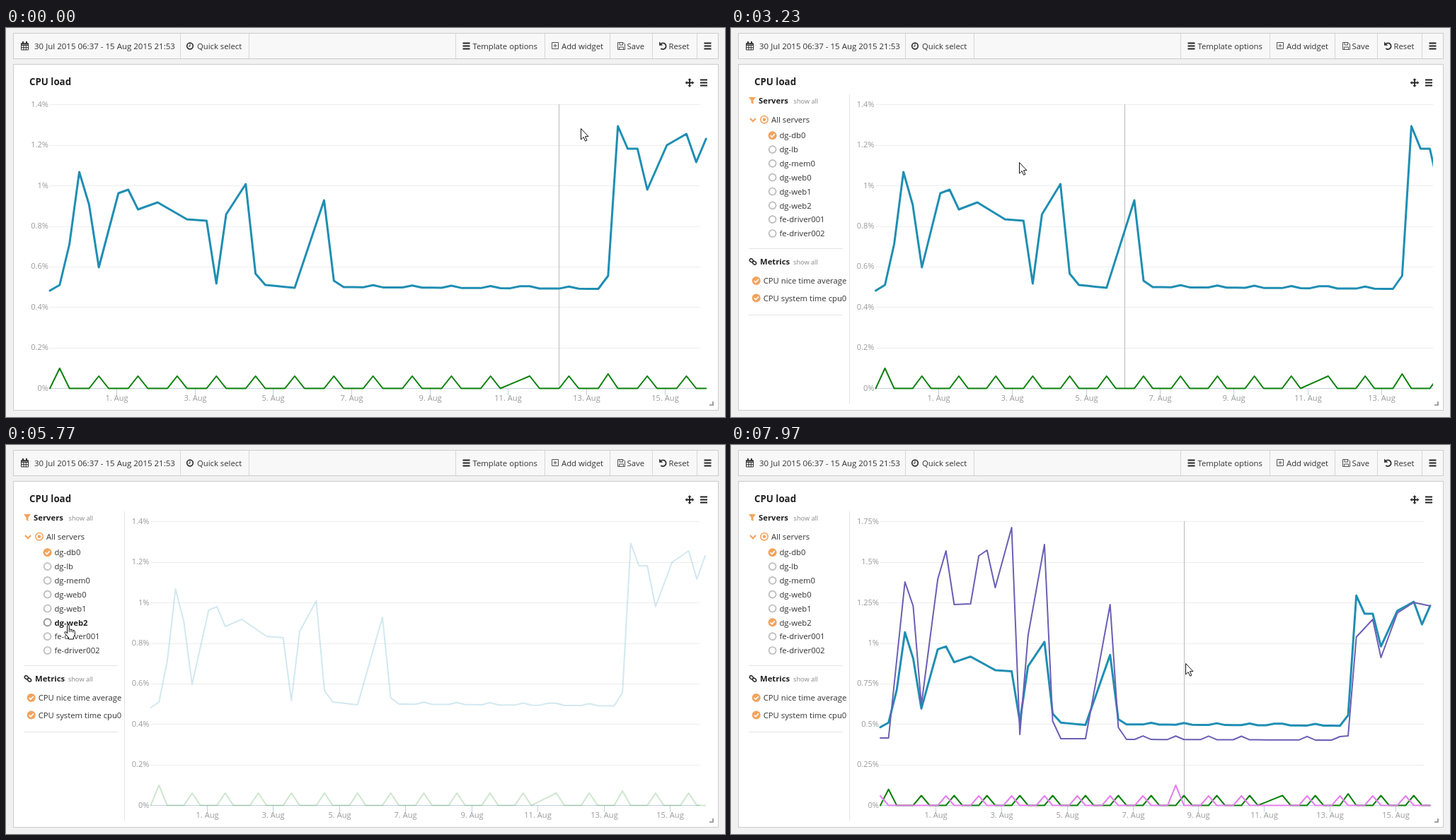
These frames come from a looping animation (1016 px wide and 551 px high, 8000 ms). An HTML page:

```html
<!DOCTYPE html>
<html lang="en">
<head>
<meta charset="utf-8">
<title>CPU load widget</title>
<style>
  html, body { margin: 0; width: 100%; height: 100%; overflow: hidden; background: #f1f1f1; }
  svg { display: block; width: 1016px; height: 551px; font: 11.3px "Open Sans", sans-serif; fill: #333; }
  .title { font-size: 13.3px; font-weight: 700; fill: #222; }
  .head { font-weight: 700; fill: #222; }
  .small { font-size: 9.2px; fill: #888; }
  .axis text { font-size: 11.1px; fill: #999; }
  .rule { stroke: #e4e4e4; fill: none; }
  .grid { stroke: #ededed; }
  .base { stroke: #c0d0e0; }
  .ink { stroke: #333; fill: none; }
  .soft { stroke: #555; fill: none; }
  .orange { fill: #f3a35c; }
  .ring { fill: #fff; stroke: #bbb; stroke-width: 1.7; }
  .series path { fill: none; stroke-width: 2; stroke-linejoin: round; stroke-linecap: round; }
  .item.hover text { font-weight: 700; fill: #222; }
  .item.hover .ring { stroke: #999; stroke-width: 2; }
  .tick { fill: none; stroke: #fff; stroke-width: 1.8; }
  .item .on { display: none; }
  .item.checked .on { display: inline; }
  .item.checked .ring { display: none; }
</style>
</head>
<body>
<svg viewBox="0 0 1016 551">
  <defs>
    <path id="bars" d="M-5-4H5M-5 0H5M-5 4H5" stroke="#222" stroke-width="2"/>
    <g id="check"><circle r="6" class="orange"/><path class="tick" d="M-3 0L-.8 2.3 3.2-2"/></g>
    <clipPath id="plot"><rect x="20" y="90" width="972" height="450"/></clipPath>
  </defs>

  <g id="toolbar">
    <rect x="10.5" y="7.5" width="996" height="36" fill="#f8f8f8" stroke="#ccc"/>
    <path stroke="#d6d6d6" d="M246.5 8V43M343.5 8V43M635.5 8V43M761.5 8V43M853.5 8V43M913.5 8V43M976.5 8V43"/>
    <g class="ink">
      <path d="M21.5 22H31.5V31H21.5ZM21.5 24.5H31.5M21.5 27.7H31.5M25 24V31M28.3 24V31"/>
      <path d="M21 22.5H32M24 19V23M29 19V23" stroke-width="2"/>
      <circle cx="260" cy="25.5" r="4.3" stroke-width="1.7"/><path d="M260 22.5V26H257.8"/>
      <path d="M925 22.8A4.4 4.4 0 1 1 925.3 29" stroke-width="1.8"/>
    </g>
    <path class="soft" d="M771.5 20.5H780.5V29.5H771.5ZM773.5 25H778.7M776 22.5V27.7"/>
    <path class="soft" d="M864.5 20.5H872L874.5 23V30.5H864.5ZM867 20.5V24H871.5V20.5M866.5 30.5V27H872.5V30.5"/>
    <path d="M923 19.5V24.8H928.3Z"/>
    <use href="#bars" x="650.5" y="25.5"/><use href="#bars" x="991.5" y="25.5"/>
    <text x="40" y="30" font-size="11.5">30 Jul 2015 06:37 - 15 Aug 2015 21:53</text>
    <text x="270" y="30">Quick select</text>
    <text x="659.5" y="30">Template options</text>
    <text x="785" y="30">Add widget</text>
    <text x="877.5" y="30">Save</text>
    <text x="936.5" y="30">Reset</text>
  </g>

  <rect x="10.5" y="51.5" width="996" height="490" fill="#fff" stroke="#ccc"/>
  <text class="title" x="33" y="81">CPU load</text>
  <use href="#bars" x="986" y="77.5"/>
  <g id="handles">
    <path d="M961 77.5H971M966 72.5V82.5" stroke="#222" stroke-width="1.8"/>
    <path d="M966 71L968.6 74H963.4ZM966 84L968.6 81H963.4ZM959.5 77.5L962.5 74.9V80.1ZM972.5 77.5L969.5 74.9V80.1Z"/>
    <path d="M994 534H999V529" fill="none" stroke="#888" stroke-width="1.6"/>
  </g>

  <g id="sidebar">
    <path class="rule" d="M25 312.5H158M25 406.5H158M167.5 94V533"/>
    <path class="orange" d="M25 98H35L31.5 102.5V108L28.5 106V102.5Z"/>
    <text class="head" x="39" y="107">Servers</text><text class="small" x="88.5" y="107">show all</text>
    <path d="M27 128L31 132.2 35 128" fill="none" stroke="#f3a35c" stroke-width="2.2"/>
    <circle cx="47" cy="129.7" r="5.2" fill="#fff" stroke="#f3a35c" stroke-width="1.6"/>
    <circle class="orange" cx="47" cy="129.7" r="2.3"/>
    <text x="57" y="134">All servers</text>
    <g id="servers"></g>
    <g class="ink" stroke-width="1.6" transform="translate(31 331) rotate(40)">
      <rect x="-5.5" y="-2" width="5.6" height="4" rx="2"/><rect x="-.2" y="-2" width="5.6" height="4" rx="2"/>
    </g>
    <text class="head" x="41" y="335">Metrics</text><text class="small" x="88" y="335">show all</text>
    <use href="#check" x="35.7" y="358"/><text x="45.7" y="362">CPU nice time average</text>
    <use href="#check" x="35.7" y="382.5"/><text x="45.7" y="386.5">CPU system time cpu0</text>
  </g>

  <g id="chart" clip-path="url(#plot)">
    <g class="axis" id="axis"></g>
    <line id="cross" y1="108" y2="510" stroke="#bbb"/>
    <g class="series" id="series"></g>
  </g>

  <g id="menu">
    <rect x="840" y="90" width="153" height="231" fill="#000" opacity=".12"/>
    <rect x="838.5" y="88.5" width="153" height="230" fill="#f7f7f7" stroke="#b8b8b8"/>
    <rect id="lit" x="839" width="152" height="25.5" fill="#fff"/>
  </g>

  <g id="cursor">
    <path id="arrow" fill="#fff" stroke="#111" d="M.5.5V16L4.1 12.6 6.6 18.2 8.9 17.2 6.5 11.7H11Z"/>
    <path id="hand" fill="#fff" stroke="#111" stroke-linejoin="round"
      d="M4.5 13V2Q4.5.5 5.8.5 7.2.5 7.2 2V7.5Q8.5 5.8 10 7.8 11.4 6.8 12.6 8.6 15.3 8 15.3 10.5V14.5L13.5 18.5V21H6.5V19L1 12.5Q.2 10.8 1.8 10.5Q3 10.6 4.5 13ZM7.2 7.5V11M10 8V11M12.6 9V11.5"/>
  </g>
</svg>

<script>
const LOOP = 8000, BASE = 510.5, ROW = 19.83, MENU_ROW = 25.5;
const MENU_OPEN = 1430, SIDEBAR_OPEN = 2730, CLEARED = 6330, RELOADED = 6530;
const LAG = 270; // the page reacts to the pointer this late
const SAMPLES = 68, LAST = SAMPLES - 1;

const $ = id => document.getElementById(id);
const svgAdd = (parent, html) => parent.insertAdjacentHTML('beforeend', html);
const range = n => [...Array(n).keys()];
const show = (el, on) => el.setAttribute('display', on ? 'inline' : 'none');
const lerp = (a, b, u) => a + (b - a) * u;
const part = (t, from, to) => Math.min(1, Math.max(0, (t - from) / (to - from)));
const swing = u => .5 - Math.cos(Math.PI * u) / 2;
const easeOut = u => 1 - (1 - u) ** 2;

// A spike every fourth sample, with a few taller or missing ones.
const spikes = (phase, top, odd) => range(SAMPLES).map(i => odd[i] ?? (i % 4 === phase ? top : BASE));

// Straight lines between key points; the idle stretch ripples with the spikes.
function load(keys, beat, ripple) {
  return range(SAMPLES).map(i => {
    const n = Math.max(1, keys.findIndex(k => k[0] >= i));
    const [a, ya] = keys[n - 1], [b, yb] = keys[n];
    const idle = i > 30 && i < 57;
    return lerp(ya, yb, (i - a) / (b - a)) - (idle && beat[i] < 500 ? ripple : 0);
  });
}

const green = spikes(1, 493, { 1: 482, 47: 504.7, 48: 498.8, 57: 490 });
const pink = spikes(0, 497, { 4: BASE, 36: 482, 48: BASE });
const blue = load([
  [0, 372], [1, 364], [2, 306], [3, 204], [4, 250], [5, 339], [7, 234], [8, 229], [9, 257], [11, 247],
  [14, 271], [16, 273], [17, 362], [18, 264], [20, 221], [21, 348], [22, 364], [25, 368], [28, 244],
  [29, 358], [30, 367], [56, 369.5], [57, 351], [58, 139], [59, 171], [60, 171], [61, 229], [63, 166],
  [65, 150], [66, 190], [67, 157]], green, 3);
const purple = load([
  [0, 415], [1, 415], [3, 194], [4, 228], [5, 368], [7, 190], [8, 150], [9, 226], [11, 225], [12, 157],
  [13, 149], [14, 202], [16, 117], [17, 410], [18, 270], [20, 141], [21, 391], [22, 416], [25, 416],
  [28, 226], [29, 400], [30, 417], [56, 418], [57, 412], [58, 272], [60, 247], [61, 301], [63, 238],
  [65, 223], [67, 228]], pink, 5);

// Each curve's heights are stage pixels on an axis that tops out at max.
const series = [
  { ys: blue, color: '#1f8eb3', max: 1.4 },
  { ys: green, color: '#0a800a', max: 1.4 },
  { ys: purple, color: '#6a5fb5', max: 1.75 },
  { ys: pink, color: '#e57eee', max: 1.75 }
];

// Pointer moves: start, end, x, y. It rests in between.
const moves = [
  [160, 170, 877, 138], [330, 1130, 985, 75], [1170, 1200, 977, 75],
  [1430, 2100, 953, 115], [2100, 2230, 951, 125], [2300, 2330, 942, 130],
  [2730, 3230, 407, 190], [3600, 3800, 347, 201], [3800, 4370, 177, 222],
  [4430, 5230, 103, 239], [5300, 5430, 97, 254], [5570, 5770, 82, 254], [5770, 6000, 62, 254],
  [6530, 7300, 402, 311], [7330, 7750, 642, 309]
];
function pointerAt(t) {
  let x = t < 0 ? 781 : 812, y = 142;
  for (const [from, to, nx, ny] of moves) {
    const u = easeOut(part(t, from, to));
    x = lerp(x, nx, u);
    y = lerp(y, ny, u);
  }
  return { x, y };
}

function layout(t) {
  if (t >= RELOADED) return { left: 211, width: 777, max: 1.75 };
  if (t < SIDEBAR_OPEN) return { left: 62, width: 927.2, max: 1.4 };
  return { left: 204.5, width: lerp(927.2, 783.5, swing(part(t, 3061, 3471))), max: 1.4 };
}

function build() {
  const names = ['dg-db0', 'dg-lb', 'dg-mem0', 'dg-web0', 'dg-web1', 'dg-web2', 'fe-driver001', 'fe-driver002'];
  names.forEach((name, i) => svgAdd($('servers'),
    `<g class="item${i ? '' : ' checked'}" transform="translate(58.6 ${152.2 + i * ROW})">
      <circle class="ring" r="5"/><use class="on" href="#check"/><text x="9.8" y="4.2">${name}</text></g>`));

  const line = d => `<path class="ink" d="${d}" stroke-width="1.5"/>`;
  const solid = d => `<path d="${d}"/>`;
  const items = [
    ['Widget settings', '<circle class="ink" r="2.9" stroke-width="2.4"/><circle class="ink" r="4.6" stroke-width="1.4" stroke-dasharray="1.8 1.8"/>'],
    ['Show legend', line('M-5-4H5.5M-1-1.3H5.5M-1 1.3H5.5M-5 4H5.5') + solid('M-5-2.5L-2 0-5 2.5Z')],
    ['Show tooltip', line('M-5-4H5V4H-5ZM-5-3H5M-3-.5H3.5M-3 2H3.5')],
    ['Enable time lock', solid('M-3-5H3V-4L2-3.5V-.5L3.6 1.5H.6L0 5.5-.6 1.5H-3.6L-2-.5V-3.5L-3-4Z')],
    ['Line width', line('M-5.5-5V4.5H6M-4 2.5L-1-.5 1 1 5-3.5M2.5-4H5V-1.5')],
    ['Chart type', line('M-5.5-5V4.5H6') + solid('M-4 3V.5L-1.5-3 1-.8 3-2.5 5 1V3Z')],
    ['Aggregator mode', '<circle class="ink" r="4.2" stroke-width="1.5"/>' + solid('M0-4.5A4.5 4.5 0 0 0 0 4.5Z')],
    ['Export data', line('M-4-4H4V4H-4Z') + solid('M-1.6-2.5L2.4 0-1.6 2.5Z')],
    ['Delete this widget', '<path d="M-3-3L3 3M3-3L-3 3" stroke="#333" stroke-width="2.5"/>']
  ];
  items.forEach(([name, icon], i) => svgAdd($('menu'),
    `<g transform="translate(854 ${101.5 + i * MENU_ROW})">${icon}<text x="18" y="4">${name}</text>
      ${i > 3 && i < 7 ? solid('M123-3.5L127-.3 123 3Z') : ''}</g>`));

  range(8).forEach(k => {
    const y = 510.3 - 57.43 * k, crisp = Math.round(y) + .5;
    svgAdd($('axis'), `<line class="${k ? 'grid' : 'base'}" y1="${crisp}" y2="${crisp}"/>
      <text class="y" text-anchor="end" y="${y + 3.4}"></text>`);
  });
  range(8).forEach(k => svgAdd($('axis'),
    `<g class="x"><path class="base" d="M0 511V520"/><text text-anchor="middle" y="528">${2 * k + 1}. Aug</text></g>`));
  series.forEach(s => svgAdd($('series'), `<path stroke="${s.color}"/>`));
}

build();
const gridLines = document.querySelectorAll('#axis > line');
const yLabels = document.querySelectorAll('#axis .y');
const xLabels = document.querySelectorAll('#axis .x');
const curves = document.querySelectorAll('#series path');
const rows = document.querySelectorAll('.item');

function drawChart(t, seen, menuOpen) {
  const { left, width, max } = layout(t);
  const xAt = i => left + width * i / LAST;

  gridLines.forEach(l => { l.setAttribute('x1', left); l.setAttribute('x2', left + width - 8); });
  yLabels.forEach((l, k) => {
    l.setAttribute('x', left - 2);
    l.textContent = +(max / 7 * k).toFixed(2) + '%';
  });
  xLabels.forEach((g, k) => {
    const x = Math.round(left + width * (.1023 + .11936 * k)) - .5;
    g.setAttribute('transform', `translate(${x} 0)`);
  });

  const dim = swing(part(t, 4500, 4700)) - swing(part(t, 7400, 7700));
  curves.forEach((c, n) => {
    const s = series[n], scale = s.max / max;
    const points = s.ys.map((y, i) => `${xAt(i).toFixed(2)} ${(BASE - (BASE - y) * scale).toFixed(2)}`);
    show(c, s.max <= max);
    c.setAttribute('d', 'M' + points.join('L'));
    c.style.opacity = 1 - .8 * dim;
  });

  // The crosshair snaps to the nearest sample.
  const hovered = !menuOpen && seen.x > left && seen.y > 108;
  const x = Math.floor(xAt(Math.round((seen.x - left) / width * LAST))) + .5;
  $('cross').setAttribute('x1', x);
  $('cross').setAttribute('x2', x);
  show($('cross'), hovered);
  curves[0].style.strokeWidth = hovered ? 3 : 2;
}

function render(t) {
  const pointer = pointerAt(t), seen = pointerAt(t - LAG);
  const blank = t >= CLEARED && t < RELOADED;
  const menuOpen = t >= MENU_OPEN && t < SIDEBAR_OPEN;
  show($('chart'), !blank);
  show($('sidebar'), t >= SIDEBAR_OPEN && !blank);
  show($('menu'), menuOpen);
  show($('handles'), !menuOpen);
  drawChart(t, seen, menuOpen);

  const lit = Math.floor((seen.y - 89) / MENU_ROW);
  show($('lit'), lit >= 0);
  $('lit').setAttribute('y', 89 + MENU_ROW * lit);

  const inList = pointer.x < 150;
  const over = inList ? Math.round((pointer.y - 150) / ROW) : -1;
  rows.forEach((r, i) => r.classList.toggle('hover', i === over));
  rows[5].classList.toggle('checked', t >= RELOADED);

  const onIcon = pointer.x > 970 && pointer.y < 88;
  $('cursor').setAttribute('transform', `translate(${Math.round(pointer.x)} ${Math.round(pointer.y)})`);
  show($('hand'), inList || onIcon);
  show($('arrow'), !inList && !onIcon);
}

const start = performance.now();
function tick() {
  render((performance.now() - start) % LOOP);
  requestAnimationFrame(tick);
}
tick();
</script>
</body>
</html>
```
